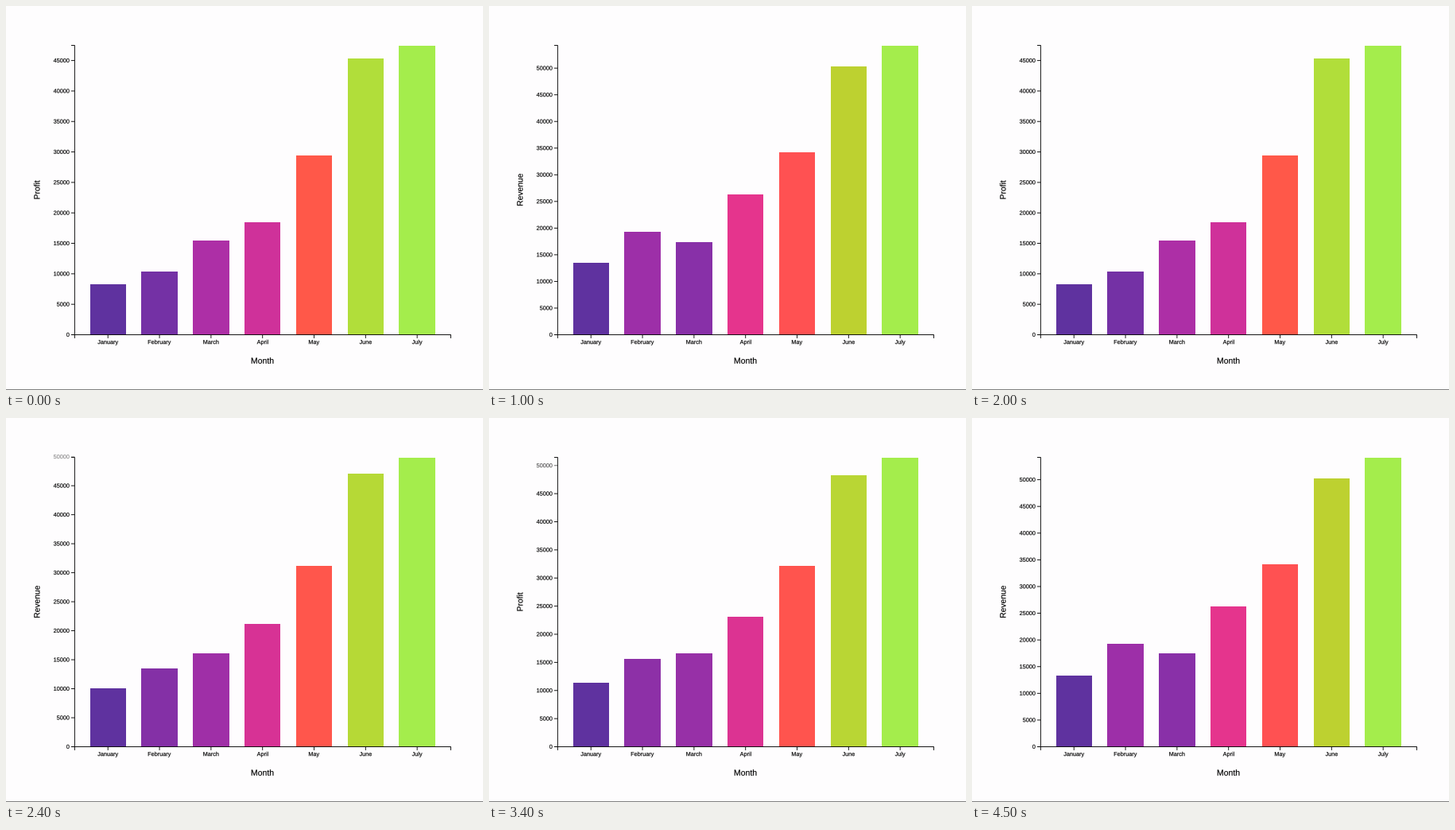
Recreate the animation shown at these times as a matplotlib script. Size 600 by 483 pixels, loop 4.6 s.

```python
import math

import matplotlib.pyplot as plt
import numpy as np
from matplotlib.animation import FuncAnimation
from matplotlib.patches import PathPatch, Rectangle
from matplotlib.textpath import TextPath
from matplotlib.transforms import Affine2D

W, H, DPI = 600, 483, 100
FRAMES, INTERVAL = 46, 100
SCALE = 0.728
LEFT, RIGHT, TOP, BOTTOM = 86.4, 559.5, 49.5, 413.5
TICK = 6 * SCALE
INK = "#0c0c0c"

MONTHS = ["January", "February", "March", "April", "May", "June", "July"]
PROFIT = np.array([8342, 10342, 15423, 18432, 29434, 45343, 47492])
REVENUE = np.array([13432, 19342, 17443, 26342, 34213, 50321, 54273])
TICKS = np.arange(0, 50001, 5000)


def rainbow(t):
    """Cubehelix rainbow, slightly darkened by a display gamma."""
    d = abs(t - 0.5)
    hue = math.radians(360 * t - 100 + 120)
    sat, light = 1.5 - 1.5 * d, 0.8 - 0.9 * d
    amp = sat * light * (1 - light)
    c, s = math.cos(hue), math.sin(hue)
    rgb = [
        light + amp * (-0.14861 * c + 1.78277 * s),
        light + amp * (-0.29227 * c - 0.90649 * s),
        light + amp * 1.97294 * c,
    ]
    return np.clip(rgb, 0, 1) ** 1.17


def bar_colors(values):
    span = (values - values.min()) / (values.max() - values.min())
    return np.array([rainbow(0.5 * v) for v in span])


def heights(values, data):
    return (BOTTOM - TOP) * values / data.max()


def mix(a, b, t):
    return a + (b - a) * t


def ease(t):
    t = min(max(t, 0), 1)
    return 4 * t**3 if t < 0.5 else 1 - 4 * (1 - t) ** 3


fig = plt.figure(figsize=(W / DPI, H / DPI), dpi=DPI, facecolor="#fefdfe")
ax = fig.add_axes([0, 0, 1, 1])
ax.set_xlim(0, W)
ax.set_ylim(H, 0)
ax.axis("off")


def px(width):
    return width * 72 / DPI


def line(xs, ys):
    return ax.plot(xs, ys, color=INK, lw=px(0.95), snap=False,
                   solid_capstyle="butt", solid_joinstyle="miter")[0]


def label(text, x, y, size, align="middle", turn=0):
    """Text outline with its baseline at y, aligned on x."""
    path = TextPath((0, 0), text, size=size, prop={"family": "Liberation Sans"})
    box = path.get_extents()
    anchor = box.x1 if align == "end" else (box.x0 + box.x1) / 2
    place = Affine2D().translate(-anchor, 0).scale(1, -1).rotate_deg(turn)
    path = place.translate(x, y).transform_path(path)
    patch = PathPatch(path, facecolor="black", edgecolor="black", lw=px(0.15))
    return ax.add_patch(patch)


# Bars
step = 650 / 7.3 * SCALE
band = 0.7 * step
starts = LEFT - 0.3 + 0.3 * step + step * np.arange(7)
bars = [ax.add_patch(Rectangle((x, BOTTOM), band, 0, lw=0)) for x in starts]

# Axes
line([LEFT - TICK, LEFT, LEFT, LEFT - TICK], [TOP, TOP, BOTTOM, BOTTOM])
line([LEFT, LEFT, RIGHT, RIGHT],
     [BOTTOM + TICK, BOTTOM, BOTTOM, BOTTOM + TICK])
for x, month in zip(starts + band / 2, MONTHS):
    line([x, x], [BOTTOM, BOTTOM + TICK])
    label(month, x, BOTTOM + 11.6, 10 * SCALE)

y_marks = []
for value in TICKS:
    mark = line([LEFT - TICK, LEFT], [0, 0])
    text = label(str(value), LEFT - 6.8, 2.4, 10 * SCALE, "end")
    y_marks.append((mark, text))

label("Month", 322.6, 449.7, 10.5)
titles = [label(name, 42.4, 231, 10.3, turn=-90)
          for name in ("Profit", "Revenue")]
ax.add_patch(Rectangle((0, H - 1), W, 1, color="#808080", lw=0))

BAR_H = heights(PROFIT, PROFIT), heights(REVENUE, REVENUE)
BAR_C = bar_colors(PROFIT), bar_colors(REVENUE)
TICK_H = heights(TICKS, PROFIT), heights(TICKS, REVENUE)


def draw(n):
    # The data set flips every ten frames, with a 250 ms transition.
    turn, k = divmod(n - 3, 10)
    revenue = turn % 2 == 0
    done = ease(0.058 + 0.4 * k)
    share = done if revenue else 1 - done

    for bar, h, c in zip(bars, mix(*BAR_H, share), mix(*BAR_C, share)):
        bar.set_y(BOTTOM - h)
        bar.set_height(h)
        bar.set_facecolor(c)

    for (mark, text), h, value in zip(y_marks, mix(*TICK_H, share), TICKS):
        y = BOTTOM - h
        alpha = share if value > PROFIT.max() else 1
        mark.set_ydata([y, y])
        text.set_transform(Affine2D().translate(0, y) + ax.transData)
        for part in (mark, text):
            part.set_alpha(alpha)
            part.set_visible(alpha > 0.02)

    titles[0].set_visible(not revenue)
    titles[1].set_visible(revenue)
    return []


anim = FuncAnimation(fig, draw, frames=FRAMES, init_func=lambda: draw(0),
                     interval=INTERVAL, repeat=True, repeat_delay=0)
plt.show()
```
